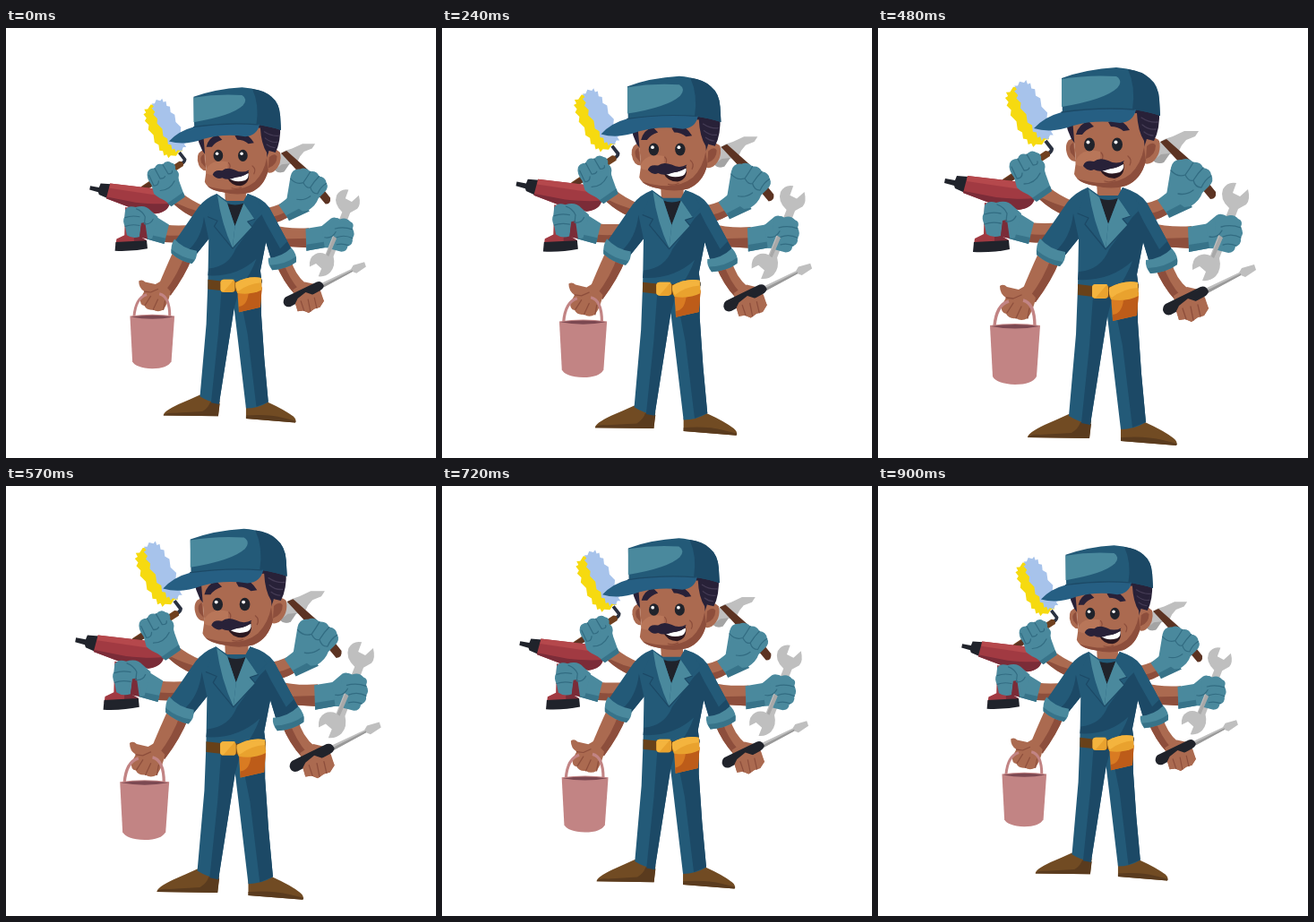
An HTML page that plays this animation: 480x480 px, repeating every 930 ms.

```html
<!DOCTYPE html>
<html lang="en">
<head>
<meta charset="utf-8">
<title>Handyman</title>
<style>
  html, body { margin: 0; height: 100%; overflow: hidden; background: #fff; }
  svg { display: block; width: 100vw; height: 100vh; }
  .navy { fill: #1c4966; }
  .blue { fill: #235a78; }
  .teal { fill: #4a899d; }
  .tealDark { fill: #377389; }
  .skin { fill: #ab6a50; }
  .skinDark { fill: #8d4e3c; }
  .hair { fill: #282138; }
  .black { fill: #20232b; }
  .red { fill: #a13a42; }
  .redDark { fill: #7b2c38; }
  .grey { fill: #bfbfbf; }
  .wood { fill: #5c3322; }
  .shoe { fill: #714b23; }
  .shoeDark { fill: #5a3b1e; }
  .pink { fill: #c28484; }
  .line { fill: none; stroke-width: 1.3; stroke-linecap: round; stroke-linejoin: round; }
  .gloveLine { stroke: #326c82; }
  .skinLine { stroke: #8d4e3c; }
</style>
</head>
<body>
<svg viewBox="0 0 480 480">
<g id="man">
  <!-- paint roller arm -->
  <g>
    <path class="skin" d="M190 177Q202 187 219 194L208 209Q193 203 180 191Z"/>
    <path class="skinDark" d="M184 190Q198 197 214 201L208 209Q193 203 180 191Z"/>
    <path id="paint" fill="#f6da10"/>
    <path id="fluff" fill="#a7c3eb"/>
    <path fill="none" stroke="#2a3140" stroke-width="4" d="M187 126L194 135Q194 138 189 141"/>
    <path fill="#70401f" d="M139 169L187 137Q193 137 192 143L144 174Q138 175 139 169Z"/>
    <path class="wood" d="M139 170L160 157 163 163 144 174Q138 175 139 170Z"/>
  </g>

  <!-- drill arm -->
  <g>
    <path class="skin" d="M169 217Q186 219 204 217L200 239Q184 240 168 239Z"/>
    <path class="skinDark" d="M168 230Q185 232 202 229L200 239Q184 240 168 239Z"/>
    <path class="red" d="M119 195L145 199 139 233 146 237 145 242 107 242 108 235 118 230Z"/>
    <path class="redDark" d="M130 197L145 199 139 233 146 237 145 242 130 242Z"/>
    <path class="black" d="M107 239L146 237 147 247Q128 251 106 250Z"/>
    <path class="black" d="M75 168L86 170 88 165 101 166 97 184 86 179 85 176 74 173Z"/>
    <path class="red" d="M100 165L160 172Q176 178 175 188 173 201 157 203L124 195 95 184Z"/>
    <path fill="#b5484c" d="M100 165L160 172Q170 176 173 182L99 171Z"/>
    <path class="redDark" d="M96 182L132 189Q160 192 175 190 173 201 157 203L124 195 95 184Z"/>
    <path class="teal" d="M153 204L174 217 168 241 146 235Z"/>
    <path class="tealDark" d="M147 229L170 234 168 241 146 235Z"/>
    <path class="teal" d="M119 198Q123 192 132 195 144 191 151 199L160 207 153 234Q146 237 143 228L139 218 137 232Q128 235 121 230L119 220Q115 212 118 207Z"/>
    <path class="redDark" d="M139 215L144 214 147 235 137 233Z"/>
    <path class="line gloveLine" d="M119 208Q127 205 137 207M119 219Q127 216 137 218M133 197Q141 200 144 207L143 216M143 216Q151 217 154 210"/>
  </g>

  <!-- roller hand -->
  <g>
    <path class="teal" d="M167 169L185 157 194 182 177 193 165 184Z"/>
    <path class="tealDark" d="M172 190L192 176 194 182 177 194Z"/>
    <path class="teal" d="M147 151Q149 146 156 146 158 139 166 141 171 135 177 139 183 140 182 147 188 151 186 158L187 168 171 187Q161 184 155 178L152 167Q145 158 147 151Z"/>
    <path class="line gloveLine" d="M156 146L163 159Q168 159 169 156M166 141L173 153Q179 153 178 149M149 155L155 168Q161 168 161 162M163 174Q175 174 181 162"/>
  </g>

  <!-- hammer arm -->
  <g>
    <path class="skin" d="M290 197Q305 196 321 187L329 204Q317 213 302 216Z"/>
    <path class="skinDark" d="M297 208Q312 207 326 198L329 204Q317 213 302 216Z"/>
    <path class="grey" d="M307 148L314 128 320 124 329 121 342 115 358 115 354 121 344 125 339 131 335 139 325 141 319 150Q312 153 307 148Z"/>
    <path fill="#a4a4a4" d="M316 141L326 140 319 150Q312 153 307 148Z"/>
    <path class="wood" d="M315 127L322 124 348 147 377 183Q378 191 371 191L340 154Z"/>
    <path class="teal" d="M312 192L330 178 350 199 325 211Z"/>
    <path class="tealDark" d="M322 205L345 193 351 200 325 212Z"/>
    <path class="teal" d="M327 156Q329 146 339 147 346 144 352 150 360 149 363 156 371 157 372 164 376 171 369 177L362 184Q359 193 349 199L342 200 322 186Z"/>
    <path class="line gloveLine" d="M352 150Q348 157 343 164M363 156Q357 162 352 170M372 165Q365 169 361 178M327 159Q334 167 343 164Q347 172 352 170Q354 178 361 178M335 185Q344 187 352 181"/>
  </g>

  <!-- wrench arm -->
  <g>
    <path class="skin" d="M302 217Q326 223 350 221L350 246 315 244Z"/>
    <path class="skinDark" d="M314 235L350 234 350 246 315 244Z"/>
    <path class="teal" d="M346 222L370 218 374 245 347 250Z"/>
    <path class="tealDark" d="M347 242L373 238 374 245 347 250Z"/>
    <path class="teal" d="M366 219L378 209Q384 206 388 211L396 247 370 246Z"/>
    <path class="grey" d="M392 201Q381 191 385 180 390 171 400 173L396 184 404 188 413 180Q416 192 411 197L402 202 381 257Q384 269 377 277 371 283 362 282L366 272 359 266 351 270Q350 258 358 254 364 251 371 254Z"/>
    <path fill="#a8a8a8" d="M389 212L394 214 375 257 372 255Z"/>
    <path class="teal" d="M377 213Q383 206 389 210 397 207 402 213 408 215 405 222 409 229 405 234 406 242 399 244 398 251 391 251L379 248 385 234 376 228Z"/>
    <path class="line gloveLine" d="M383 222Q394 219 405 223M385 233Q395 229 405 234M385 242Q392 240 400 243M370 233Q379 235 384 226"/>
  </g>

  <!-- legs and shoes -->
  <g>
    <path class="shoe" d="M213 431L238 438 236 458 167 457Q167 452 186 443 200 437 213 431Z"/>
    <path class="shoeDark" d="M167 457Q170 453 181 454L216 452Q224 447 226 440L238 442 236 458Z"/>
    <path class="shoe" d="M271 445L298 440Q320 450 330 458 335 462 333 466L271 461Z"/>
    <path class="shoeDark" d="M271 457Q299 455 318 460L334 464 333 466 271 461Z"/>
    <path class="blue" d="M223 290L290 290 290 328 294 386 299 440Q286 448 271 448L256 322 237 442Q224 440 213 433L221 342Z"/>
    <path class="navy" d="M240 300L262 300 256 322 237 443 227 441 236 355Z"/>
    <path class="navy" d="M262 300L290 300 290 328 294 386 299 440 284 446 273 355Z"/>
  </g>

  <!-- bucket and its arm -->
  <g>
    <path class="skin" d="M182 245L203 259Q194 282 176 306L159 298Q169 273 182 245Z"/>
    <path class="skinDark" d="M194 254L203 259Q194 282 176 306L168 302Q186 279 194 254Z"/>
    <path class="skin" d="M136 288Q140 285 144 289L157 292 164 288 176 301Q174 314 167 324 160 328 154 324 146 325 143 319 137 318 138 310L143 301Q136 297 136 288Z"/>
    <path class="line skinLine" d="M143 301L151 302 160 298M144 318L151 307M154 324L160 311M167 324L169 313"/>
    <path fill="none" stroke="#c28484" stroke-width="3.4" d="M130 333Q132 309 146 305M162 304Q175 307 175 333"/>
    <path class="pink" d="M125 332Q153 328 181 332L177 389Q172 398 153 398 132 397 128 389Z"/>
    <path fill="#7b4851" d="M126 333Q153 329 180 333 153 338 126 333Z"/>
  </g>

  <!-- screwdriver and its arm -->
  <g>
    <path class="skin" d="M309 267L327 259Q332 280 347 292L332 304Q318 289 309 267Z"/>
    <path class="skinDark" d="M309 267L318 264Q325 285 338 299L332 304Q318 289 309 267Z"/>
    <path class="skin" d="M330 299L345 289 358 292 365 301 369 313 364 321 357 323 350 328 343 325 336 326 333 316Z"/>
    <path class="grey" d="M365 291L403 273 406 268 420 264 422 270 410 278 405 276 368 296Z"/>
    <path fill="#999" d="M367 293L405 274 405 276 368 296Z"/>
    <path class="black" d="M321 308L360 289Q366 287 369 294 368 298 364 300L327 320Q320 322 318 315 318 310 321 308Z"/>
    <path class="skin" d="M336 310L346 302 355 305 364 302 369 313 364 321 357 323 350 328 343 325 336 326 333 316Z"/>
    <path class="line skinLine" d="M344 325L340 313M352 326L349 311M360 322L357 309"/>
  </g>

  <!-- jacket -->
  <g>
    <path class="skin" d="M244 170H271V192L257 203 245 190Z"/>
    <path class="blue" d="M234 178L247 187 268 187 273 178Q293 184 300 195L329 249 303 262 296 239 289 275 291 290Q256 298 223 290L224 235 207 256 180 240 211 195Q219 184 234 178Z"/>
    <path class="navy" d="M258 247L284 211 299 196 329 249 303 262 296 239 289 275 291 290 266 293Q278 277 284 260 259 283 223 281L224 272Q249 270 258 247Z"/>
    <path class="blue" d="M287 197L300 195 323 238 314 247 297 217Z"/>
    <path class="navy" d="M218 207L224 235 207 256 197 250Q215 235 218 207Z"/>
    <path class="black" d="M247 190Q257 194 268 190L257 219Z"/>
    <path class="blue" d="M234 178L247 188 257 220 254 247 231 219 235 212 223 207Z"/>
    <path class="teal" d="M235 180L247 189 257 219 254 246Q240 216 235 180Z"/>
    <path class="teal" d="M268 190L282 210 273 213 279 220 254 247 257 219Z"/>
    <path class="blue" d="M273 178L268 188 281 209 292 198 282 182Z"/>
    <path class="line" stroke="#1c4966" d="M223 207L235 212 231 219 254 247 279 220 273 213 282 210"/>
    <path class="teal" d="M181 235Q191 247 209 250 210 260 203 266 188 263 177 253 176 242 181 235Z"/>
    <path class="tealDark" d="M177 248Q190 259 206 261L203 266Q188 263 177 253Z"/>
    <path class="teal" d="M299 259Q316 258 328 246 336 255 334 264 322 273 304 274 298 267 299 259Z"/>
    <path class="tealDark" d="M301 268Q321 267 334 257L334 264Q322 273 304 274Z"/>
  </g>

  <!-- belt -->
  <g>
    <path fill="#684119" d="M223 286Q256 291 291 286L290 299Q256 303 223 298Z"/>
    <path fill="#d97b22" d="M260 298L291 295 289 321 262 327Z"/>
    <path fill="#bd5c19" d="M274 304L291 296 289 321 262 327 262 320Q272 319 274 304Z"/>
    <path fill="#e9a22e" d="M258 290Q274 281 290 284L291 299Q277 306 260 303 257 297 258 290Z"/>
    <path fill="#f4b43e" d="M258 290Q274 281 290 284L290 290Q274 291 261 301 257 297 258 290Z"/>
    <rect x="239" y="286" width="18" height="16" rx="4" fill="#e9a22e"/>
    <path fill="#f4b43e" d="M243 286H256L243 301Q239 302 239 298V290Q239 286 243 286Z"/>
  </g>

  <!-- head -->
  <g>
    <path class="skin" d="M219 123Q209 124 210 136 212 149 221 149Z"/>
    <path class="skinDark" d="M218 128Q212 131 215 139L220 145Z"/>
    <path class="skin" d="M296 127Q306 118 314 126 317 141 306 150 299 154 294 149Z"/>
    <path class="skinDark" d="M300 132Q307 126 310 131 310 142 299 146Z"/>
    <path class="hair" d="M209 103L221 101 220 129 216 124Q211 114 209 103Z"/>
    <path class="hair" d="M285 88L314 91Q315 113 308 126L300 124 297 133Q289 121 289 109Z"/>
    <path class="line" stroke="#453c55" d="M294 100Q303 106 312 105M295 108Q302 114 310 113M297 116Q302 120 307 120"/>
    <path class="skin" d="M217 101L289 95Q290 115 297 126L299 148Q294 169 277 176 261 181 242 176 223 173 219 163L221 149Z"/>
    <path class="skinDark" d="M297 133L299 148Q294 169 277 176 261 181 242 176 228 174 222 168 261 180 282 163 294 151 297 133Z"/>
    <path fill="#b87659" d="M248 138Q231 134 223 144 217 152 225 154 238 157 248 151Z"/>
    <path class="line skinLine" d="M249 139Q253 143 249 149M279 143Q284 147 281 153"/>
    <path class="hair" d="M221 119Q224 107 235 104L241 110Q232 113 228 119ZM257 105Q271 97 281 114L274 115Q268 110 260 110Z"/>
    <ellipse class="black" cx="236" cy="130" rx="6" ry="7.4"/>
    <ellipse class="black" cx="267" cy="130" rx="6" ry="7.4"/>
    <circle cx="234.5" cy="127.5" r="2" fill="#fff"/>
    <circle cx="265.5" cy="127.5" r="2" fill="#fff"/>
    <path fill="#2b1820" d="M247 157Q264 157 274 150 277 165 264 168 252 168 247 157Z"/>
    <path fill="#fff" d="M249 158Q264 158 274 152 275 158 270 161 257 165 249 158Z"/>
    <path class="hair" d="M229 154Q231 147 241 149 247 144 257 148 266 153 275 148 272 156 259 157 248 162 241 158 235 161 229 154Z"/>
    <path class="line skinLine" d="M253 171Q259 173 265 170"/>
  </g>

  <!-- cap -->
  <g>
    <path class="blue" d="M205 56Q232 46 266 44 291 46 303 56 313 64 314 80L315 98Q304 94 286 91L206 101Z"/>
    <path class="navy" d="M279 46Q295 48 303 56 313 64 314 80L315 98Q304 94 284 91 288 66 279 46Z"/>
    <path class="teal" d="M205 57Q235 52 266 54 274 59 267 67 253 80 205 88Z"/>
    <path fill="#265f83" d="M174 112Q186 99 205 94 246 88 288 91 285 105 270 106 243 102 218 109 194 118 174 112Z"/>
    <path class="line" stroke="#1c4966" d="M205 94Q246 88 286 91"/>
  </g>
</g>
</svg>
<script>
const LOOP = 930, STEP = 30, HALF = 450, TILT = 0.46;
const man = document.getElementById('man');

const bend = (v, power) => Math.sign(v) * Math.abs(v) ** power;

// Ragged outline of a sloping, rounded block.
function ragged(id, cx, cy, width, length) {
  const points = Array.from({length: 36}, (_, i) => {
    const angle = i / 18 * Math.PI, reach = i % 2 ? 2 : -1;
    const u = bend(Math.cos(angle), 0.5) * (width + reach);
    const v = bend(Math.sin(angle), 0.8) * (length + reach);
    const x = cx + u * Math.cos(TILT) + v * Math.sin(TILT);
    const y = cy - u * Math.sin(TILT) + v * Math.cos(TILT);
    return x.toFixed(1) + ' ' + y.toFixed(1);
  });
  document.getElementById(id).setAttribute('d', 'M' + points.join('L') + 'Z');
}
ragged('paint', 167, 98, 15, 34);
ragged('fluff', 174, 92, 10.5, 34);

function draw(now) {
  const t = Math.floor(now % LOOP / STEP) * STEP;
  const p = Math.max(0, 1 - Math.abs(t - HALF) / HALF);
  const scale = 0.887 + 0.1145 * p * p * (3 - 2 * p);
  man.setAttribute('transform', `translate(244 240) scale(${scale}) translate(-244 -240)`);
  requestAnimationFrame(draw);
}
draw(performance.now());
</script>
</body>
</html>
```
